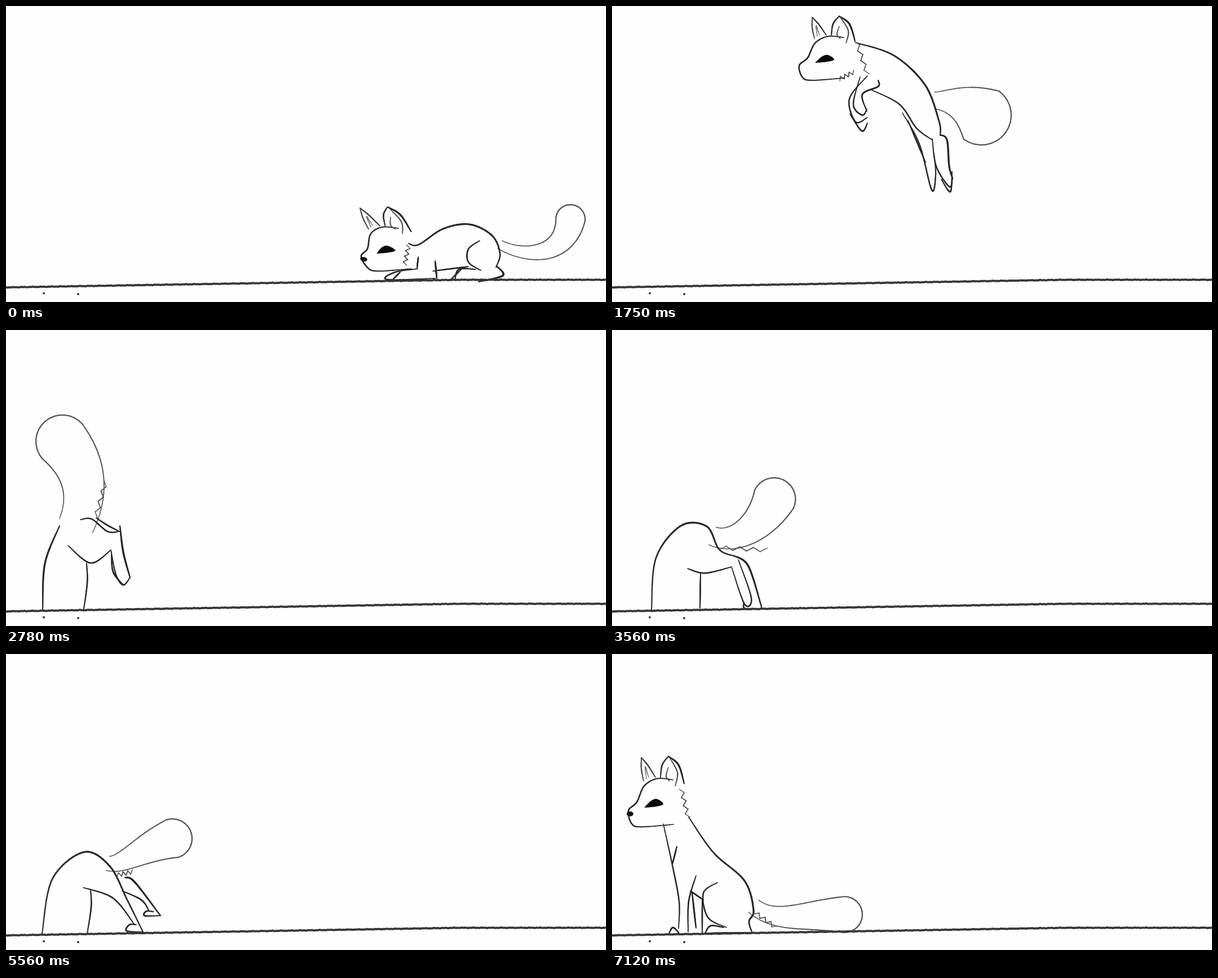
Write an HTML page with a canvas that moves like this. It is 1064 px wide and 526 px high and loops after 7470 ms.

```html
<!DOCTYPE html>
<html lang="en">
<head>
<meta charset="utf-8">
<title>Fox pounce</title>
<style>
  html, body { margin: 0; width: 100%; height: 100%; overflow: hidden; background: #fefefe; }
  canvas { display: block; width: 100vw; height: 100vh; }
</style>
</head>
<body>
<canvas id="stage" width="1064" height="526"></canvas>
<script>
const ctx = document.getElementById('stage').getContext('2d');
const LOOP = 7470;
const lerp = (a, b, u) => a + (b - a) * u;
const mix = (p, q, u) => [lerp(p[0], q[0], u), lerp(p[1], q[1], u)];
const range = (n, f) => Array.from({ length: n + 1 }, (_, i) => f(i / n, i));
const parse = text => text.split(' ').map(s => s.split(',').map(Number));

function rotate([x, y], [cx, cy], degrees) {
  const a = degrees * Math.PI / 180, c = Math.cos(a), s = Math.sin(a);
  return [cx + (x - cx) * c - (y - cy) * s, cy + (x - cx) * s + (y - cy) * c];
}

// Smooth curve through a few points, always with the same number of samples so curves can blend.
function curve(text) {
  const p = parse(text), at = i => p[Math.max(0, Math.min(p.length - 1, i))];
  return range(48, t => {
    const s = t * (p.length - 1), i = Math.min(p.length - 2, Math.floor(s)), u = s - i;
    return [0, 1].map(c => {
      const [a, b, d, e] = [at(i - 1)[c], at(i)[c], at(i + 1)[c], at(i + 2)[c]];
      return b + u / 2 * (d - a + u * (2 * a - 5 * b + 4 * d - e + u * (3 * (b - d) + e - a)));
    });
  });
}

// Fur: a zigzag from one point to another.
function tuft(text) {
  const [p, q] = parse(text), len = Math.hypot(q[0] - p[0], q[1] - p[1]);
  const n = [(p[1] - q[1]) / len, (q[0] - p[0]) / len];
  return range(7, (t, i) => mix(p, q, t).map((v, c) => v + (i % 2 ? -4.5 : 2.5) * n[c]));
}

// Tail: a Bezier spine that swells from a thin root to a round tip.
function tailOutline({ spine, root, tip }, bend) {
  const p = parse(spine).map((q, i, all) => rotate(q, all[0], bend * i / 3));
  const along = u => {
    const a = mix(p[0], p[1], u), b = mix(p[1], p[2], u), c = mix(p[2], p[3], u);
    const d = mix(a, b, u), e = mix(b, c, u);
    return { at: mix(d, e, u), angle: Math.atan2(e[1] - d[1], e[0] - d[0]) };
  };
  const around = (u, turn) => {
    const { at, angle } = along(u), r = lerp(root, tip, u ** 1.5);
    return [at[0] + r * Math.cos(angle + turn), at[1] + r * Math.sin(angle + turn)];
  };
  const quarter = Math.PI / 2;
  return [
    ...range(20, u => around(u, -quarter)),
    ...range(16, u => around(1, lerp(-quarter, quarter, u))),
    ...range(20, u => around(1 - u, quarter))
  ];
}

// Head features, measured from the nose: [width (0 = filled), grey, curve].
const headShapes = Object.entries({
  face: [2.4, 40, '80,-54 52,-56 29,-44 16,-18 1,-4 7,17 24,22 81,18'],
  eye: [0, 8, '29,-9 41,-20 52,-23 63,-15 51,-11 29,-9'],
  farEar: [1.9, 75, '28,-52 24,-72 24,-90'],
  farEarBack: [2, 60, '24,-90 36,-77 49,-58'],
  farEarInner: [1.4, 110, '33,-56 31,-75 37,-58'],
  nearEar: [2.2, 50, '58,-58 61,-78 72,-92'],
  nearEarBack: [2.7, 35, '72,-92 90,-78 100,-48'],
  nearEarInner: [1.8, 75, '74,-90 88,-66 84,-44'],
  nearEarFold: [1.6, 85, '72,-74 68,-60 74,-52']
}).map(([name, [width, grey, text]]) => ({ name, width, grey, points: curve(text) }));

const nosePoints = range(16, t => [4 + 6 * Math.cos(t * 2 * Math.PI), 1 + 4 * Math.sin(t * 2 * Math.PI)]);

const crouch = {
  pivot: [780, 488],
  head: { x: 630, y: 449, sx: 1.03, sy: 1, shear: 0.3, nose: 1 },
  tufts: ['713,425 706,460'],
  lines: {
    back: '714,422 732,424 775,396 822,388 862,408 876,440 869,464',
    heel: '870,462 881,479 838,490',
    haunch: '840,417 820,432 820,455 842,470',
    shin: '833,468 803,468 796,488',
    foot: '810,465 788,487',
    belly: '757,471 820,463',
    elbow: '761,453 764,484',
    chest: '731,446 729,466',
    arm: '730,467 690,473 676,486 762,484',
    toes: '699,473 686,486'
  }
};

const poses = {
  crouchUp: { ...crouch, tail: { spine: '876,424 915,446 990,450 1001,379', root: 8, tip: 26 } },
  crouchDown: { ...crouch, tail: { spine: '868,427 930,415 945,460 1006,451', root: 14, tip: 28 } },
  leap: {
    pivot: [480, 170],
    head: { x: 331, y: 110, sx: 1, sy: 1, shear: 0, nose: 0 },
    tail: { spine: '572,168 600,168 625,172 655,194', root: 15, tip: 53 },
    tufts: ['432,62 452,122', '403,131 430,118'],
    lines: {
      back: '432,65 500,88 555,140 580,205 582,230',
      heel: '582,229 594,238 598,285 604,306',
      haunch: '515,190 545,245 567,327 574,300 571,262',
      far: '525,204 556,278',
      belly: '460,149 510,175 540,217 568,238',
      shin: '568,236 575,285 598,321 604,306',
      foot: '584,308 600,330 603,294',
      arm: '453,124 421,165 432,206 453,198',
      chest: '440,126 428,175 444,194 452,183',
      elbow: '472,132 472,143 444,157 452,187',
      toes: '422,192 443,222 453,208'
    }
  },
  tailUp: {
    pivot: [105, 497],
    tail: { spine: '124,348 145,300 145,250 100,198', root: 32, tip: 47 },
    tufts: ['176,268 158,333'],
    lines: {
      back: '65,497 69,415 95,348',
      haunch: '110,383 150,414 186,391',
      rump: '132,337 152,336 180,358 201,358',
      far: '160,334 180,347 201,358',
      heel: '202,348 208,395 220,440',
      shin: '186,391 195,435 208,453 220,440',
      toes: '187,394 190,430 208,453',
      front: '143,414 144,450 137,502'
    }
  },
  push: {
    pivot: [110, 497],
    tail: { spine: '178,366 215,385 265,365 300,329', root: 17, tip: 38 },
    tufts: ['190,388 275,392'],
    lines: {
      back: '70,497 78,405 122,348 168,349 190,390 218,402',
      belly: '134,424 165,432 212,421',
      front: '157,432 156,495',
      shin: '212,421 235,487 247,476 224,408',
      heel: '216,401 242,420 266,495',
      foot: '234,484 236,495 266,495'
    }
  },
  lift: {
    pivot: [110, 497],
    tail: { spine: '180,372 205,378 240,345 295,328', root: 13, tip: 35 },
    tufts: ['196,394 225,388'],
    lines: {
      back: '64,497 82,400 138,352 184,377 215,437 243,494',
      belly: '137,415 190,434 228,481',
      front: '150,418 151,450 144,497',
      shin: '206,421 240,437 254,457',
      heel: '211,397 228,405 274,465',
      foot: '274,465 246,465 249,457 262,458',
      toes: '243,494 214,492 219,481 231,481'
    }
  },
  sit: {
    pivot: [200, 490],
    head: { x: 28, y: 283, sx: 1, sy: 1.1, shear: 0, nose: 1 },
    tail: { spine: '251,448 290,480 340,462 412,463', root: 14, tip: 32 },
    tufts: ['122,240 134,291', '253,460 290,487'],
    lines: {
      back: '136,290 180,353 235,403 251,455 243,475 248,494',
      front: '91,302 107,375 119,440 118,488',
      chest: '115,342 107,374',
      arm: '149,394 136,440 135,494',
      far: '139,421 162,437',
      elbow: '142,424 149,487',
      shin: '160,436 160,496',
      haunch: '187,406 162,425 170,468 203,486',
      belly: '165,496 247,495',
      toes: '101,497 108,486 119,496',
      foot: '165,496 175,483 198,486'
    }
  }
};

// Poses over time; each may be moved, turned and have its tail bent.
const key = (time, pose, { dx = 0, dy = 0, turn = 0, bend = 0 } = {}) => ({ time, pose, dx, dy, turn, bend });
const keys = [
  key(0, 'crouchUp'), key(377, 'crouchDown'), key(623, 'crouchUp'), key(870, 'crouchDown'),
  key(1090, 'crouchUp'), key(1310, 'crouchDown', { dx: 4, turn: -1 }),
  key(1640, 'leap', { dx: 133, dy: 133, turn: 22 }),
  ...range(5, (_, i) => key(1750 + 110 * i, 'leap', { dx: -66 * i, dy: 13 * i * i, turn: -17 * i })),
  key(2410, 'tailUp', { bend: 16 }), key(2780, 'tailUp'), key(3040, 'tailUp', { bend: -12 }),
  key(3430, 'tailUp', { bend: 20 }), key(3560, 'push', { bend: -14 }),
  key(3950, 'lift'), key(4390, 'push'), key(4780, 'lift', { bend: 5 }),
  key(5170, 'push', { bend: 22 }), key(5560, 'lift'), key(5820, 'push', { bend: -18 }),
  key(6080, 'lift', { bend: -12 }), key(6340, 'push'), key(6600, 'lift'),
  key(6730, 'sit', { dx: 10, dy: -38, turn: 5 }), key(6860, 'sit', { turn: -4 }),
  key(6990, 'sit', { turn: 1 }), key(7120, 'sit')
];

// Each drawing is held until the next of these moments.
const holds = [0, ...[
  [130, 870, 7], [980, 1640, 7], [1750, 2410, 7], [2520, 3170, 6], [3300, 3950, 6],
  [4130, 4780, 6], [4910, 5560, 6], [5690, 6340, 6], [6470, 7120, 6]
].flatMap(([first, last, count]) => range(count - 1, u => lerp(first, last, u)))];

const weights = { back: 2.9, heel: 3, elbow: 2.6 };

function strokesFor({ pose, dx, dy, turn, bend }) {
  const { pivot, head, tail, tufts, lines } = poses[pose], strokes = {};
  const add = (name, width, grey, points) => {
    strokes[name] = { width, grey, points: points.map(p => {
      const [x, y] = rotate(p, pivot, turn);
      return [x + dx, y + dy];
    }) };
  };
  add('tail', 2.1, 85, tailOutline(tail, bend));
  for (const [name, text] of Object.entries(lines)) add(name, weights[name] || 2.3, 40, curve(text));
  tufts.forEach((text, i) => add('tuft' + i, 1.7, 75, tuft(text)));
  if (head) {
    const fit = ([x, y]) => [head.x + head.sx * x + head.shear * y, head.y + head.sy * y];
    for (const s of headShapes) add(s.name, s.width, s.grey, s.points.map(fit));
    add('nose', 0, 20, nosePoints.map(([x, y]) => fit([x * head.nose, y * head.nose])));
  }
  return strokes;
}

function figureAt(time) {
  const i = keys.findLastIndex(k => k.time <= time + 0.5);
  const from = keys[i], to = keys[i + 1] || from;
  const u = to === from ? 0 : Math.max(0, time - from.time) / (to.time - from.time);
  const a = strokesFor(from), b = strokesFor(to), near = u < 0.5 ? a : b;
  return Object.keys(near).map(name => a[name] && b[name]
    ? { ...near[name], points: a[name].points.map((p, k) => mix(p, b[name].points[k], u)) }
    : near[name]);
}

// Pencil line: thin at both ends, thicker in the middle.
function drawStroke({ width, grey, points }) {
  ctx.fillStyle = ctx.strokeStyle = `rgb(${grey} ${grey} ${grey})`;
  if (!width) {
    ctx.beginPath();
    points.forEach(p => ctx.lineTo(...p));
    ctx.fill();
    return;
  }
  for (let k = 1; k < points.length; k++) {
    ctx.lineWidth = width * (0.65 + 0.45 * Math.sin(Math.PI * k / points.length));
    ctx.beginPath();
    ctx.moveTo(...points[k - 1]);
    ctx.lineTo(...points[k]);
    ctx.stroke();
  }
}

function drawGround() {
  ctx.strokeStyle = ctx.fillStyle = '#363638';
  ctx.lineWidth = 3.8;
  ctx.beginPath();
  for (let x = 0; x <= 1064; x += 2)
    ctx.lineTo(x, Math.max(486.5, 500 - 0.0168 * x) + 0.3 * Math.sin(x * 0.9) + 0.25 * Math.sin(x * 0.37));
  ctx.stroke();
  for (const [x, y] of [[67, 510.5], [128, 512]]) {
    ctx.beginPath();
    ctx.arc(x, y, 2, 0, 2 * Math.PI);
    ctx.fill();
  }
}

function draw(time) {
  ctx.fillStyle = '#fefefe';
  ctx.fillRect(0, 0, 1064, 526);
  ctx.lineCap = ctx.lineJoin = 'round';
  ctx.save();
  ctx.beginPath();
  ctx.rect(0, 0, 1064, 500);
  ctx.clip();
  figureAt(time).forEach(drawStroke);
  ctx.restore();
  drawGround();
}

const start = performance.now();
function tick() {
  const t = (performance.now() - start) % LOOP;
  draw(holds.findLast(h => h <= t + 0.5));
  requestAnimationFrame(tick);
}
tick();
</script>
</body>
</html>
```
